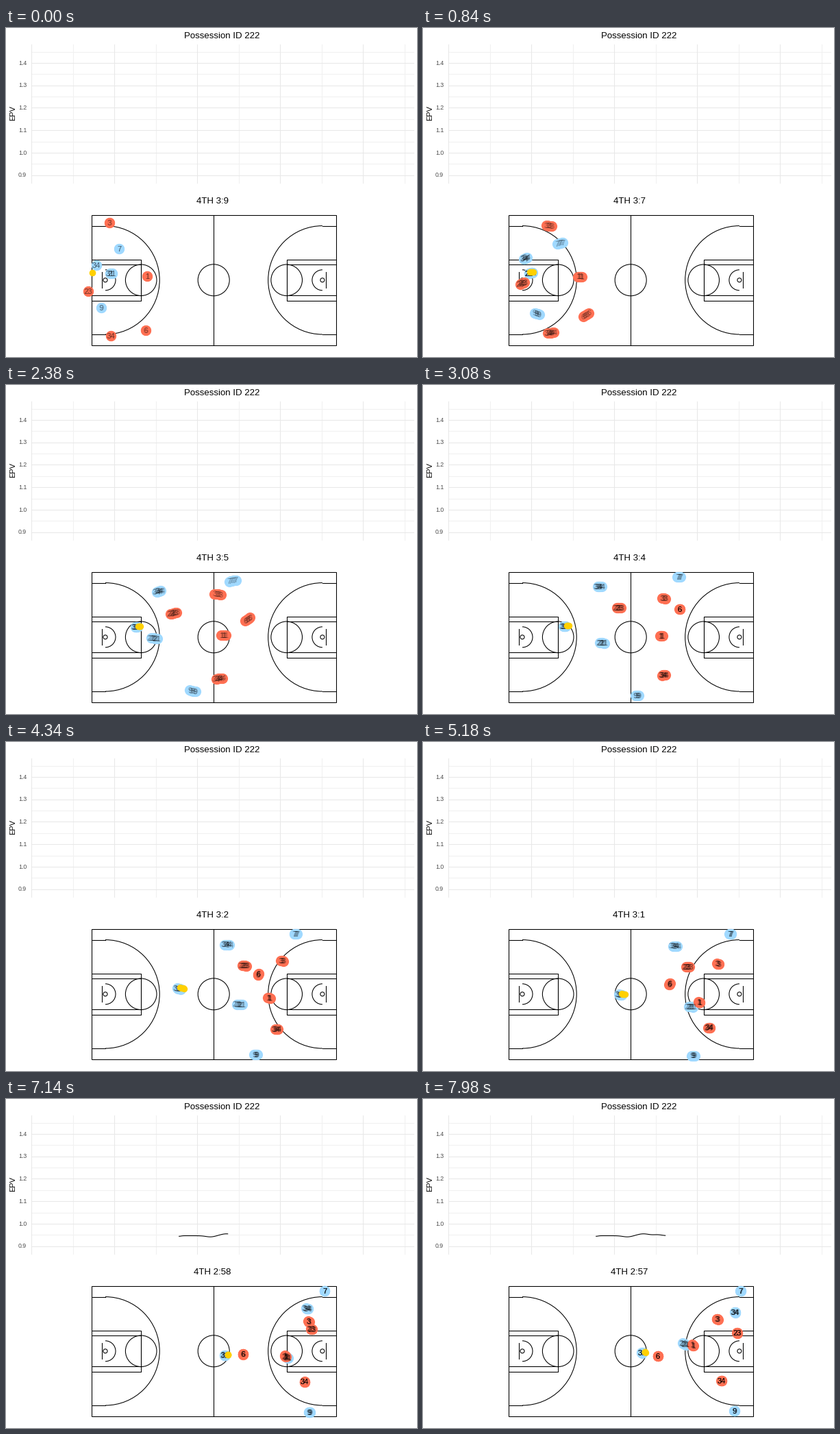
A matplotlib script for the animation above (8000 ms loop, 600 by 480 pixels).

```python
import numpy as np
import matplotlib.pyplot as plt
from matplotlib.animation import FuncAnimation
from matplotlib.patches import Arc, Circle, Rectangle

plt.rcParams["font.family"] = "Liberation Sans"

W, H, DPI = 600, 480, 100
PX = 72 / DPI                  # points per pixel
LOOP, TICK, STEP = 8000, 40, 140
COPIES = 6                     # tracking samples visible in one step
RED, BLUE, GOLD = "#FF7053", "#A0D9FF", "#FFD000"


def run(*points, start=0):
    """Smooth run through four spots: tip-in, half court, arrival, end."""
    keys = np.array([start, 22, 45, 57], float)
    p = np.array(points, float)
    gap = np.diff(keys)
    slope = np.diff(p, axis=0) / gap[:, None]
    m = np.zeros_like(p)
    m[0] = 0.12 * slope[0]
    for i in (1, 2):
        # weighted harmonic mean, flat where the direction turns
        a, b = slope[i - 1], slope[i]
        same = a * b > 0
        wa, wb = 2 * gap[i] + gap[i - 1], gap[i] + 2 * gap[i - 1]
        a, b = np.where(same, a, 1), np.where(same, b, 1)
        m[i] = np.where(same, (wa + wb) / (wa / a + wb / b), 0)
    g, h = gap[1:]
    m[3] = 0.75 * ((2 * h + g) * slope[2] - h * slope[1]) / (g + h)

    def at(t):
        t = np.maximum(t, start)
        i = np.clip(np.searchsorted(keys, t, side="right") - 1, 0, 2)
        h = gap[i][:, None]
        s = (t - keys[i])[:, None] / h
        rise = s * s * (3 - 2 * s)
        return (p[i] + (p[i + 1] - p[i]) * rise
                + h * s * (1 - s) * ((1 - s) * m[i] - s * m[i + 1]))

    return at


VISITORS = {
    "7": run((165, 322), (374, 280), (464, 280), (464, 280)),
    "34": run((132, 346), (258, 294), (416, 301), (456, 311)),
    "31": run((152, 358), (207, 352), (315, 375), (320, 370)),
    "21": run((155, 358), (262, 376), (423, 388), (382, 357), start=8),
    "9": run((139, 408), (313, 453), (426, 458), (455, 455)),
}
HOSTS = {
    "3": run((151, 284), (352, 311), (447, 326), (430, 321)),
    "1": run((206, 362), (348, 366), (415, 384), (394, 359)),
    "23": run((120, 384), (286, 325), (426, 331), (459, 341)),
    "34": run((153, 449), (352, 423), (433, 414), (436, 411)),
    "6": run((204, 441), (375, 327), (351, 367), (343, 375)),
}


def ball_at(t):
    """Passed in from the baseline, then dribbled beside the handler."""
    s = np.clip(t / 8, 0, 1)
    dx = -26 + 30.5 * s * s * (3 - 2 * s)
    return VISITORS["31"](t) + np.column_stack([dx, np.full_like(t, -1)])


def epv_y(x):
    def bump(mid, width):
        return np.exp(-((x - mid) / width) ** 2)

    return (199.2 + 0.8 * bump(253, 4) + 1.7 * bump(299, 10)
            - 2.8 * bump(322, 12) - 1.4 * bump(343, 9))


fig = plt.figure(figsize=(W / DPI, H / DPI), dpi=DPI, facecolor="white")
ax = fig.add_axes([0, 0, 1, 1])
# a slight offset keeps half-pixel lines on the right pixel when snapped
ax.set(xlim=(0.3, W + 0.3), ylim=(H - 0.3, -0.3))
ax.axis("off")


def line(xs, ys, color="black", width=1.07, **kw):
    return ax.plot(xs, ys, color=color, lw=width * PX, **kw)[0]


def label(x, y, s, size, color="black", ha="center", va="baseline", **kw):
    return ax.text(x, y, s, fontsize=size * PX, color=color, ha=ha, va=va, **kw)


def draw_chart():
    def grid(x0, y0, color, z):
        for x in np.arange(x0, 595, 121):
            line([x, x], [24, 226], color, 1.07, zorder=z)
        for y in np.arange(y0, 226, 32.75):
            line([37, 595], [y, y], color, 1.07, zorder=z)

    grid(98.3, 34.2, "#F1F1F1", 0)
    grid(37.5, 50.5, "#E8E8E8", 0.5)
    for n in range(6):
        label(30.5, 53.4 + 32.75 * n, f"{1.4 - n / 10:.1f}", 8.8, "#4D4D4D", "right")
    label(315.3, 14.8, "Possession ID 222", 13.2)
    label(10.3, 124, "EPV", 11, rotation=90, va="center")


def draw_court():
    cy = 367.5
    pen = dict(fill=False, ec="black", lw=1.07 * PX, zorder=1)

    def ring(x, r):
        ax.add_patch(Circle((x, cy), r, **pen))

    ax.add_patch(Rectangle((125.5, 272.5), 356.5, 189.7, **pen))
    line([303.5, 303.5], [272.5, 462.2], zorder=1)
    ring(303.5, 23)
    for side in (-1, 1):
        def fx(x):
            return x if side < 0 else 607.5 - x

        def arc(r):
            start = -90 if side < 0 else 90
            ax.add_patch(Arc((fx(145.3), cy), 2 * r, 2 * r, theta1=start,
                             theta2=start + 180, color="black",
                             lw=1.07 * PX, zorder=1))

        for y in (288.5, 446.5):
            line([fx(125.5), fx(145.3)], [y, y], zorder=1)
        arc(79.2)
        arc(15)
        for top, bottom in ((337.5, 397.5), (345, 390)):
            line([fx(x) for x in (125.5, 197.5, 197.5, 125.5)],
                 [top, top, bottom, bottom], zorder=1)
        ring(fx(197.5), 22.8)
        ring(fx(145.3), 3)
        line([fx(140.5)] * 2, [356, 379], zorder=1)


def dots(color, radius, z):
    return ax.scatter([], [], s=(2 * radius * PX) ** 2, c=color, linewidths=0, zorder=z)


draw_chart()
draw_court()
curve = line([], [], zorder=2)
clock = label(301.3, 255.2, "", 13.2)
blue, red, ball = dots(BLUE, 7.6, 3), dots(RED, 7.6, 4), dots(GOLD, 4.7, 6)
TEAMS = [(blue, VISITORS), (red, HOSTS)]
tags = {(dot, name): [label(0, 0, name, 11, alpha=0.35, zorder=5) for _ in range(COPIES)]
        for dot, team in TEAMS for name in team}


def update(frame):
    k = int((frame + 0.5) * TICK // STEP)
    live = COPIES if k else 2
    ts = np.maximum(k + np.linspace(-0.45, 0.45, COPIES)[-live:], 0)

    for dot, team in TEAMS:
        spots = {name: path(ts) for name, path in team.items()}
        dot.set_offsets(np.concatenate(list(spots.values())))
        for name, pts in spots.items():
            for j, tag in enumerate(tags[dot, name]):
                tag.set_visible(j < live)
                if j < live:
                    tag.set_position((pts[j, 0], pts[j, 1] + 3.7))
    ball.set_offsets(ball_at(ts))

    left = int(189.2 - 0.21 * k)
    clock.set_text(f"4TH {left // 60}:{left % 60}")

    xs = np.arange(253, 294 + 5.08 * (k - 45), 1.0)
    curve.set_data(xs, epv_y(xs))
    return []


anim = FuncAnimation(fig, update, frames=LOOP // TICK, interval=TICK,
                     repeat=True, repeat_delay=0, cache_frame_data=False)
plt.show()
```
